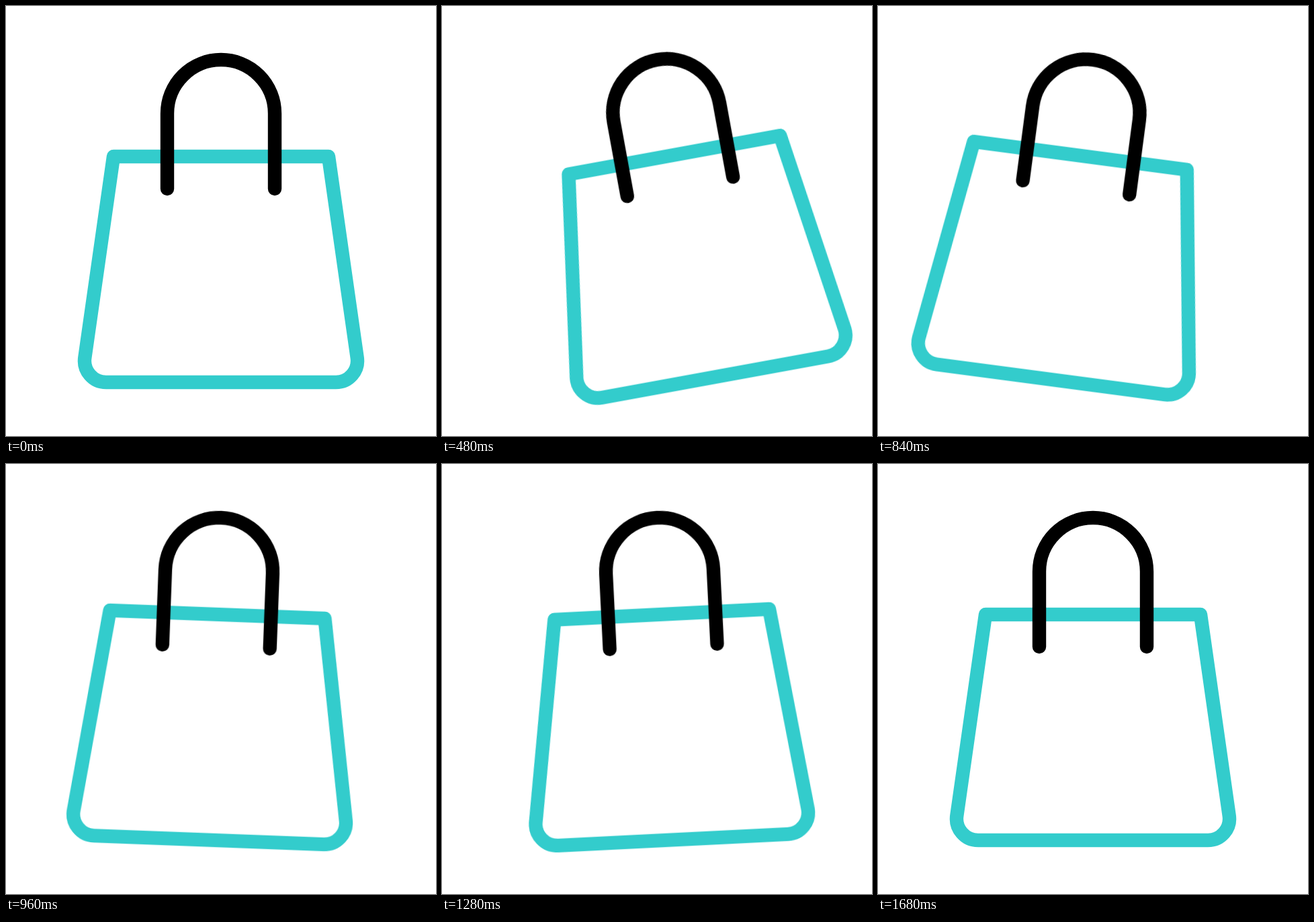
Recreate the animation shown at these times as an HTML page. Size 640x640 px, loop 2000 ms.

```html
<!DOCTYPE html>
<html lang="en">
<head>
<meta charset="utf-8">
<title>Swinging bag</title>
<style>
  html, body { margin: 0; width: 100%; height: 100%; overflow: hidden; background: #fff; }
  svg { display: block; width: 100%; height: 100%; }
  #bag {
    fill: none;
    stroke-width: 20.4;
    stroke-linecap: round;
    stroke-linejoin: round;
    transform-origin: 320px 80px;
  }
</style>
</head>
<body>
<svg viewBox="0 0 640 640">
  <g id="bag">
    <path stroke="#3cc" d="M160 224H480L522.7 523.5A32 32 0 0 1 491 560H149A32 32 0 0 1 117.3 523.5Z"/>
    <path stroke="#000" d="M240 272V160A80 80 0 0 1 400 160V272"/>
  </g>
</svg>
<script>
  const LOOP = 2000, STEP = 40;

  // [time in ms, angle in degrees]: a damped swing
  const swing = [[0, 0], [80, 0], [440, -11], [800, 8], [1160, -6], [1440, 2], [1680, 0], [LOOP, 0]];

  const ease = u => u * u * (3 - 2 * u);

  function angleAt(t) {
    const i = Math.max(1, swing.findIndex(([time]) => time >= t));
    const [t0, a0] = swing[i - 1], [t1, a1] = swing[i];
    return a0 + (a1 - a0) * ease((t - t0) / (t1 - t0));
  }

  // The pose holds for each 40 ms step.
  const count = LOOP / STEP;
  const poses = Array.from({ length: count + 1 }, (_, i) => ({
    offset: i / count,
    transform: `rotate(${angleAt(i * STEP).toFixed(3)}deg)`,
    easing: 'steps(1, end)'
  }));

  document.getElementById('bag').animate(poses, { duration: LOOP, iterations: Infinity });
</script>
</body>
</html>
```
